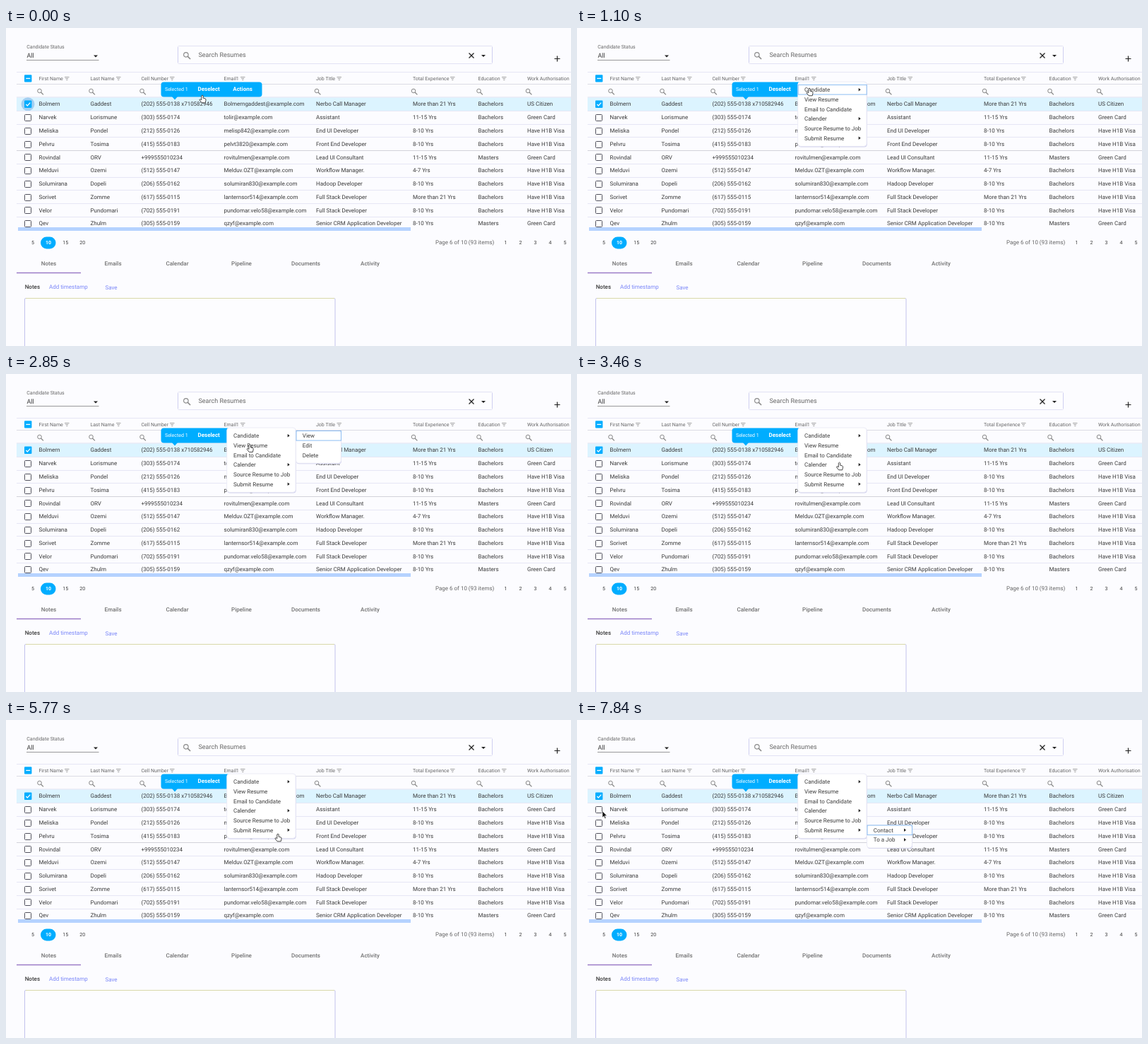
Recreate the animation shown at these times as an HTML page. Size 800 by 450 pixels, loop 8 s.

```html
<!DOCTYPE html>
<html lang="en">
<head>
<meta charset="utf-8">
<title>Candidate list</title>
<style>
html, body { margin: 0; width: 100%; height: 100%; overflow: hidden; background: #fcfcff; }
svg { display: block; width: 100%; height: 100%; }
text { font-family: Roboto, sans-serif; font-size: 8px; fill: #3a3a3a; text-rendering: geometricPrecision; }
.small { font-size: 7px; fill: #666; }
.big { font-size: 9px; }
.soft { fill: #666; }
.medium { font-weight: 500; }
.tab { font-weight: 500; fill: #707070; text-anchor: middle; }
.page { font-size: 7px; text-anchor: middle; }
.link { fill: #7a86f8; }
.light { fill: #fff; }
.action { fill: #fff; font-weight: 700; }
</style>
</head>
<body>
<svg id="stage" viewBox="0 0 800 450"></svg>
<script>
const LOOP = 8000;
const BLUE = '#00adff';
const COLUMNS = [46.5, 119.5, 191.5, 308.5, 439, 576, 668.5, 738];
const HEADERS = ['First Name', 'Last Name', 'Cell Number', 'Email1', 'Job Title',
  'Total Experience', 'Education', 'Work Authorisation'];
const FILTER_X = [83, 156, 232, 332, 468.5, 629, 702, 800];
const BACHELORS = 'Bachelors', VISA = 'Have H1B Visa', GREEN = 'Green Card';
const mail = user => user + '@example.com';
const PEOPLE = [
  ['Bolmern', 'Gaddest', '(202) 555-0138 x710582946', mail('Bolmerngaddest'), 'Nerbo Call Manager', 'More than 21 Yrs', BACHELORS, 'US Citizen'],
  ['Narvek', 'Lorismune', '(303) 555-0174', mail('tolir'), 'Assistant', '11-15 Yrs', BACHELORS, GREEN],
  ['Meliska', 'Pondel', '(212) 555-0126', mail('melisp842'), 'End UI Developer', '8-10 Yrs', BACHELORS, VISA],
  ['Pelvru', 'Tosima', '(415) 555-0183', mail('pelvt3820'), 'Front End Developer', '8-10 Yrs', BACHELORS, VISA],
  ['Rovindal', 'ORV', '+999555010234', mail('rovitulmen'), 'Lead UI Consultant', '11-15 Yrs', 'Masters', GREEN],
  ['Melduvi', 'Ozemi', '(512) 555-0147', mail('Melduv.OZT'), 'Workflow Manager.', '4-7 Yrs', BACHELORS, VISA],
  ['Solumirana', 'Dopeli', '(206) 555-0162', mail('solumiran830'), 'Hadoop Developer', '8-10 Yrs', BACHELORS, VISA],
  ['Sorivet', 'Zomme', '(617) 555-0115', mail('lanternsor514'), 'Full Stack Developer', 'More than 21 Yrs', BACHELORS, VISA],
  ['Velor', 'Pundomari', '(702) 555-0191', mail('pundomar.velo58'), 'Full Stack Developer', '8-10 Yrs', BACHELORS, VISA],
  ['Qev', 'Zhulm', '(305) 555-0159', mail('qzyf'), 'Senior CRM Application Developer', '8-10 Yrs', 'Masters', GREEN],
];

const text = (x, y, value, cls = '') => `<text x="${x}" y="${y}" class="${cls}">${value}</text>`;
const rect = (x, y, w, h, fill, extra = '') =>
  `<rect x="${x}" y="${y}" width="${w}" height="${h}" fill="${fill}" ${extra}/>`;
const path = (d, stroke, width = 1, fill = 'none') =>
  `<path d="${d}" fill="${fill}" stroke="${stroke}" stroke-width="${width}"/>`;
const row = (y, color = '#e6e6f5') => path(`M15 ${y}H800`, color);
const solid = (d, fill = '#222') => path(d, 'none', 0, fill);
const magnifier = (x, y, size = 1) =>
  `<g transform="translate(${x} ${y}) scale(${size})">` +
  '<circle cx="-1" cy="-1" r="2.8" fill="none" stroke="#888"/>' + path('M1 1l3.4 3.4', '#888', 1.3) + '</g>';
const dropdown = (x, y) => solid(`M${x - 3} ${y - 1.5}h6l-3 3z`);
const filterIcon = x => path(`M${x} 69.5h6.5M${x + 1.2} 71.5h4M${x + 2.3} 73.5h2`, '#999', 0.9);

function checkbox(y, checked) {
  return checked
    ? rect(26, y - 5.2, 10.4, 10.4, BLUE, 'rx="1"') + path(`M28.3 ${y}l2 2.2 4-4.4`, '#fff', 1.2)
    : rect(26.5, Math.round(y - 4.6) + 0.5, 9, 9, '#fff', 'rx="1" stroke="#50505c"');
}

function topBar() {
  return text(29.3, 29, 'Candidate Status', 'small') + text(29.5, 42.3, 'All', 'big') +
    path('M29 45.5H131.5', '#999') + dropdown(127, 40) +
    rect(243.5, 25.5, 445, 25, '#fdfdff', 'stroke="#e2e2f4" rx="1"') +
    path('M243.5 27V49M688.5 27V49', '#cfcff0') +
    magnifier(256, 39, 1.15) + text(272.5, 41, 'Search Resumes', 'big soft') +
    path('M655.5 35.5l7 7m0-7l-7 7', '#222', 1.3) + dropdown(676, 39.5) +
    path('M776.5 43.5h8m-4-4v8', '#222', 1.2);
}

function table() {
  let out = row(62.5) + row(79.5, '#dcdce4') + row(98, '#dcdcec') +
    rect(15, 98.5, 785, 18.5, '#dcf4ff') +
    rect(26, 66.2, 10.4, 10.4, BLUE, 'rx="1"') + path('M28.3 71.4h6', '#fff', 1.3);
  HEADERS.forEach((label, i) => {
    out += text(COLUMNS[i], 73.6, label, 'small') + filterIcon(FILTER_X[i]) +
      magnifier(COLUMNS[i] + 2, 90);
  });
  out += '<circle id="ripple" cx="31" cy="107.7" r="9.5" fill="#7db8ea"/>';
  PEOPLE.forEach((person, i) => {
    const y = 107.8 + 18.78 * i;
    if (i < 9) out += row(Math.round(y + 9) + 0.5, i === 3 ? '#d2d2da' : undefined);
    out += checkbox(y, i === 0);
    person.forEach((value, c) => out += text(COLUMNS[c], y + 2.6, value));
  });
  return out + rect(17, 282, 556, 5, '#b5d2ff');
}

function bottomArea() {
  let out = rect(49, 295.5, 21.5, 17, BLUE, 'rx="8.5"');
  [5, 10, 15, 20].forEach((n, i) =>
    out += text([38, 60, 84.3, 108.3][i], 306.2, n, n === 10 ? 'page action' : 'page'));
  out += text(608, 306.2, 'Page 6 of 10 (93 items)', 'soft');
  for (let n = 1; n <= 5; n++) out += text(686.5 + 21 * n, 306.2, n, 'page');
  ['Notes', 'Emails', 'Calendar', 'Pipeline', 'Documents', 'Activity'].forEach((label, i) =>
    out += text(60.5 + 91 * i, 335.8, label, 'tab'));
  return out + path('M15 346.5H106', '#9c7cc8', 1.3) +
    text(26.7, 369.4, 'Notes', 'medium') + text(61, 369.4, 'Add timestamp', 'link') +
    text(140.5, 369.8, 'Save', 'link') +
    path('M26.5 451V384q0-1.5 1.5-1.5H464.5q1.5 0 1.5 1.5V451', '#c2c2ec', 1, '#fdfdff') +
    path('M28 382.5H465', '#d8d8aa');
}

function popup() {
  return rect(219.5, 76.4, 143, 21, BLUE, 'rx="4"') + solid('M235 97h8l-4 4.5z', BLUE) +
    text(225, 89, 'Selected 1', 'small light') + text(271.5, 89.3, 'Deselect', 'action') +
    text(321.3, 89.3, 'Actions', 'action');
}

// A trailing ">" on an item draws its submenu arrow.
function menu(id, x, width, top, firstY, items) {
  const lastY = firstY + 13.7 * (items.length - 1);
  const height = lastY + 11.7 - top;
  let out = rect(x + 0.5, top + 1, width, height, '#ccccea', 'rx="4"') +
    rect(x, top, width, height, '#fff', 'rx="4" stroke="#e6e6f4" stroke-width=".8"') +
    rect(x + 0.5, firstY - 6.7, width - 0.5, 13.6, 'none', `id="${id}Focus" stroke="#8cbdf2"`);
  items.forEach((item, i) => {
    const y = firstY + 13.7 * i;
    out += text(x + 9.3, y + 2.9, item.replace('>', ''));
    if (item.endsWith('>')) out += solid(`M${x + width - 11.5} ${y - 2.3}v4.6l3-2.3z`);
  });
  return `<g id="${id}">${out}</g>`;
}

const hand = '<g id="hand">' + path('M-1.2 1Q0-1 1.2 1V4.2L4 4.9Q5.4 5.3 5 7.2L4.2 10.8H-.9L-4 6.8Q-3.8 5.3-2.2 6L-1.2 6.8Z', '#333', 0.9, '#fff') + '</g>';
const arrow = '<g id="arrow">' + path('M0 0V9L2.1 7.1 3.6 10.4 5 9.8 3.5 6.6H6.3Z', '#fff', 0.5, '#111') + '</g>';

document.getElementById('stage').innerHTML =
  topBar() + table() + bottomArea() + popup() +
  menu('actions', 312.7, 97.5, 76, 87.2,
    ['Candidate>', 'View Resume', 'Email to Candidate', 'Calender>', 'Source Resume to Job', 'Submit Resume>']) +
  menu('candidate', 410.5, 64, 80, 87.2, ['View', 'Edit', 'Delete']) +
  menu('calendar', 410.5, 64, 121.3, 128.3, ['Appointment', 'Interview', 'Meeting']) +
  menu('submit', 410.5, 64, 148.7, 155.7, ['Contact>', 'To a Job>']) +
  hand + arrow;

// Bursts of movement: start, end, number of discrete updates.
const BURSTS = [[110, 1100, 6], [1280, 2210, 6], [2390, 3330, 7], [3460, 3960, 5],
  [5130, 6090, 7], [6280, 6440, 2], [6990, 7840, 7]];
// Pointer tip: time, x, y.
const POINTER = [[0, 278, 95], [500, 335, 83], [800, 335, 83], [1100, 329, 85], [1280, 329, 85],
  [1840, 332, 87], [2390, 332, 87], [3330, 371.5, 125], [5130, 371.5, 125],
  [5770, 385, 161], [6850, 385, 161], [7840, 36, 129], [LOOP, 36, 129]];

function snap(t) {
  const burst = BURSTS.filter(b => b[0] <= t).pop();
  if (!burst) return 0;
  const [start, end, count] = burst;
  const gap = (end - start) / (count - 1);
  return start + gap * Math.min(count - 1, Math.floor((t - start) / gap + 1e-6));
}

function pointerAt(t) {
  const i = POINTER.findIndex(key => key[0] > t);
  const [t0, x0, y0] = POINTER[i - 1], [t1, x1, y1] = POINTER[i];
  const k = (t - t0) / (t1 - t0);
  return [x0 + (x1 - x0) * k, y0 + (y1 - y0) * k];
}

const part = id => document.getElementById(id);
const show = (id, visible) => part(id).setAttribute('visibility', visible ? 'inherit' : 'hidden');

function draw(now) {
  const t = snap(now % LOOP);
  const between = (from, to) => t >= from && t < to;
  show('actions', t >= 900);
  show('actionsFocus', between(900, 1650));
  show('candidate', between(1650, 2850));
  show('calendar', between(3700, 5440));
  show('submit', t >= 6080);
  part('ripple').setAttribute('opacity', Math.max(0, 0.6 * (1 - t / 500)));

  const [x, y] = pointerAt(t);
  const overLink = x > 265;
  show('hand', overLink);
  show('arrow', !overLink);
  for (const id of ['hand', 'arrow']) part(id).setAttribute('transform', `translate(${x} ${y})`);
  requestAnimationFrame(draw);
}
draw(0);
</script>
</body>
</html>
```
